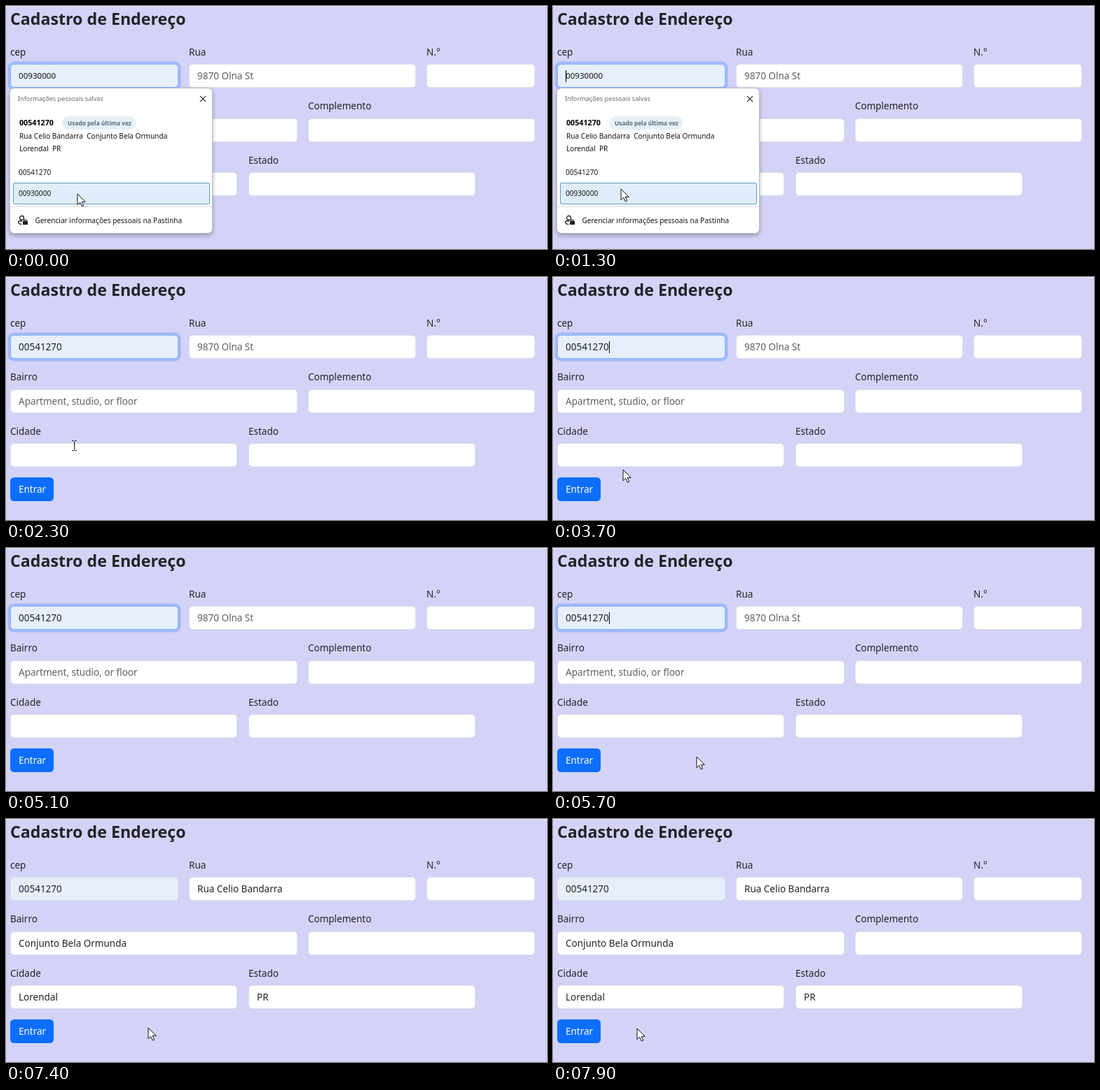
Recreate the animation shown at these times as an HTML page. Size 772 px wide and 348 px high, loop 8000 ms.

```html
<!DOCTYPE html>
<html lang="pt-BR">
<head>
<meta charset="utf-8">
<title>Cadastro de Endereço</title>
<style>
  html, body { margin: 0; width: 100%; height: 100%; overflow: hidden; }
  #stage {
    position: relative; width: 772px; height: 348px; overflow: hidden;
    background: #d3d3f7; color: #212529;
    font: 13.5px "Noto Sans", "Open Sans", sans-serif;
  }
  #stage::before {
    content: ""; position: absolute; left: 0; top: 0;
    width: 100%; height: 1px; background: #efeff5;
  }
  #stage div, #stage svg { position: absolute; box-sizing: border-box; }
  .text { white-space: pre; line-height: 20px; }
  .title { font-size: 23.2px; font-weight: 600; }
  .field {
    height: 34.2px; background: #fff;
    border: 1px solid #dee2e6; border-radius: 5.4px;
  }
  .hint { color: #5c6064; }
  .preview { font-size: 11.6px; color: #111; }
  #cep { background: #e6effb; }
  #caret { left: 18px; top: 92px; width: 1px; height: 17px; background: #000; }
  #button { left: 6px; top: 287px; width: 62px; height: 34px; border-radius: 5.4px; background: #0d6efd; }
  .white { color: #fff; }
  #popup {
    left: 5px; top: 117px; width: 290px; height: 209px; background: #fff;
    border: 1px solid #b9b9c4; border-radius: 7px;
    box-shadow: 0 3px 6px rgba(0, 0, 0, .28);
  }
  #rows .text { font-size: 10.1px; color: #151515; }
  #rows .head { font-size: 9.15px; color: #686868; }
  #rows .bold { font-size: 10.7px; font-weight: 700; color: #000; }
  #rows .tag { font-size: 8.3px; font-weight: 600; color: #5c6a78; }
  #pill { left: 80px; top: 158px; width: 105px; height: 19px; border-radius: 10px; background: #e4f0fa; }
  #line { left: 6px; top: 287px; width: 288px; height: 1px; background: #dcdcdc; }
  #pick { left: 10px; width: 281px; height: 31px; border: 1px solid #5b9bcb; border-radius: 2px; background: #deedf9; }
</style>
</head>
<body>
<div id="stage">
  <div id="form"></div>
  <div id="button"></div>
  <div id="caret"></div>
  <div id="rows">
    <div id="popup"></div>
    <div id="pill"></div>
    <div id="line"></div>
    <div id="pick"></div>
    <svg style="left:276px;top:128px" width="10" height="10" stroke="#333" stroke-width="1.1">
      <path d="M1 1L9 9M9 1L1 9"/>
    </svg>
    <svg style="left:16px;top:299px" width="17" height="16" fill="none" stroke="#222" stroke-width="1.3">
      <circle cx="6.5" cy="4.5" r="3"/>
      <path d="M7 9H3.2Q1.6 9 1.6 10.6Q1.6 13.6 6.5 13.6"/>
      <rect x="8" y="8.6" width="7" height="5.6" rx="1" fill="#222" stroke="none"/>
      <path d="M9.8 8.4V7H13.2V8.4" stroke-width="1"/>
    </svg>
  </div>
  <svg id="arrow" width="14" height="21" viewBox="-1 -1 14 21">
    <path d="M0 0V15.6L3.7 12.2L6.3 18L8.7 17L6.2 11.4H11.2Z" fill="#fff" stroke="#111" stroke-linejoin="round"/>
  </svg>
  <svg id="beam" width="9" height="17" viewBox="-4.5 -8.5 9 17" fill="none" stroke="#222">
    <path d="M-3.5 -7H-1L0 -6L1 -7H3.5M0 -6V6M-3.5 7H-1L0 6L1 7H3.5"/>
  </svg>
</div>
<script>
const LOOP = 8000;
const $ = id => document.getElementById(id);
const form = $("form"), rows = $("rows");

const ZIP = "00541270", OTHER_ZIP = "00930000";
const STREET = "Rua Celio Bandarra", AREA = "Conjunto Bela Ormunda", CITY = "Lorendal";

function add(parent, cls, x, y) {
  const el = document.createElement("div");
  el.className = cls;
  el.style.left = x + "px";
  el.style.top = y + "px";
  return parent.appendChild(el);
}

// Text placed by its left edge and vertical centre
function text(parent, x, mid, str, cls = "") {
  const el = add(parent, "text " + cls, x, mid - 10);
  el.textContent = str;
  return el;
}

function field(label, x, row, width) {
  const top = 83 + row * 77.6;
  text(form, x, top - 17.3, label);
  const box = add(form, "field", x, top);
  box.style.width = width + "px";
  return { box, value: text(form, x + 12, top + 17, "") };
}

text(form, 6, 18, "Cadastro de Endereço", "title");
const cep = field("cep", 6, 0, 240);
cep.box.id = "cep";
const street = field("Rua", 261, 0, 324);
field("N.°", 600, 0, 155);
const area = field("Bairro", 6, 1, 410);
field("Complemento", 431, 1, 324);
const city = field("Cidade", 6, 2, 324);
const state = field("Estado", 346, 2, 324);
text($("stage"), 18, 304, "Entrar", "white");
$("stage").append($("arrow"), $("beam"));
$("stage").insertBefore(rows, $("arrow"));

text(rows, 17, 133, "Informações pessoais salvas", "head");
text(rows, 19, 166.5, ZIP, "bold");
text(rows, 88, 167.5, "Usado pela última vez", "tag");
text(rows, 19, 185.5, STREET + "  " + AREA);
text(rows, 19, 203.5, CITY + "  PR");
text(rows, 18, 237.5, ZIP);
text(rows, 18, 268, OTHER_ZIP);
text(rows, 41.5, 307, "Gerenciar informações pessoais na Pastinha");

// Each step: [start ms, values...]
const cursorSteps = [
  [0, "arrow", 102, 269], [100, "arrow", 102, 268], [300, "arrow", 100, 267],
  [500, "arrow", 98, 265], [700, "arrow", 97, 264], [1300, "arrow", 97, 262],
  [1600, "arrow", 96, 248], [1700, "arrow", 96, 240],
  [2300, "beam", 97.5, 241], [3300, "beam", 97.5, 248],
  [3700, "arrow", 100, 276], [3800, "arrow", 102, 318], [3900, "none", 0, 0],
  [5300, "arrow", 128, 300], [5400, "arrow", 152, 301], [5500, "arrow", 178, 300],
  [5600, "arrow", 197, 299], [5700, "arrow", 205, 298.5],
  [7400, "arrow", 203, 298.5], [7600, "arrow", 184, 305], [7700, "arrow", 152, 307],
  [7800, "arrow", 125, 303], [7900, "arrow", 120, 299.5]
];
const caretSteps = [
  [0, 0], [200, 18], [700, 0], [1300, 18], [1700, 0],
  [3300, 80], [3800, 0], [4300, 80], [4600, 0], [5300, 80], [5800, 0]
];
const ringSteps = [[0, 1], [5800, .4], [5900, 0]];

const at = (steps, t) => steps.findLast(s => s[0] <= t);

function setValue(f, str, cls = "") {
  f.value.textContent = str;
  f.value.className = "text " + cls;
}

function show(el, on) { el.style.display = on ? "block" : "none"; }

function draw(t) {
  const open = t < 2300, second = t < 1600, filled = t >= 6100;

  show(rows, open);
  $("pick").style.top = (second ? 253 : 222) + "px";
  setValue(cep, second ? OTHER_ZIP : ZIP, open ? "preview" : "");
  setValue(street, filled ? STREET : "9870 Olna St", filled ? "" : "hint");
  setValue(area, filled ? AREA : "Apartment, studio, or floor", filled ? "" : "hint");
  setValue(city, filled ? CITY : "");
  setValue(state, filled ? "PR" : "");

  const ring = at(ringSteps, t)[1];
  cep.box.style.borderColor = ring ? "#86b7fe" : "#dee2e6";
  cep.box.style.boxShadow = `0 0 0 3.6px rgba(13,110,253,${ring * .25})`;

  const caretX = at(caretSteps, t)[1];
  show($("caret"), caretX > 0);
  $("caret").style.left = caretX + "px";

  const [, kind, x, y] = at(cursorSteps, t);
  for (const id of ["arrow", "beam"]) show($(id), kind === id);
  if (kind !== "none") {
    const [dx, dy] = kind === "arrow" ? [1, 1] : [4.5, 8.5];
    $(kind).style.left = x - dx + "px";
    $(kind).style.top = y - dy + "px";
  }
}

function tick() {
  draw(performance.now() % LOOP);
  requestAnimationFrame(tick);
}
tick();
</script>
</body>
</html>
```
